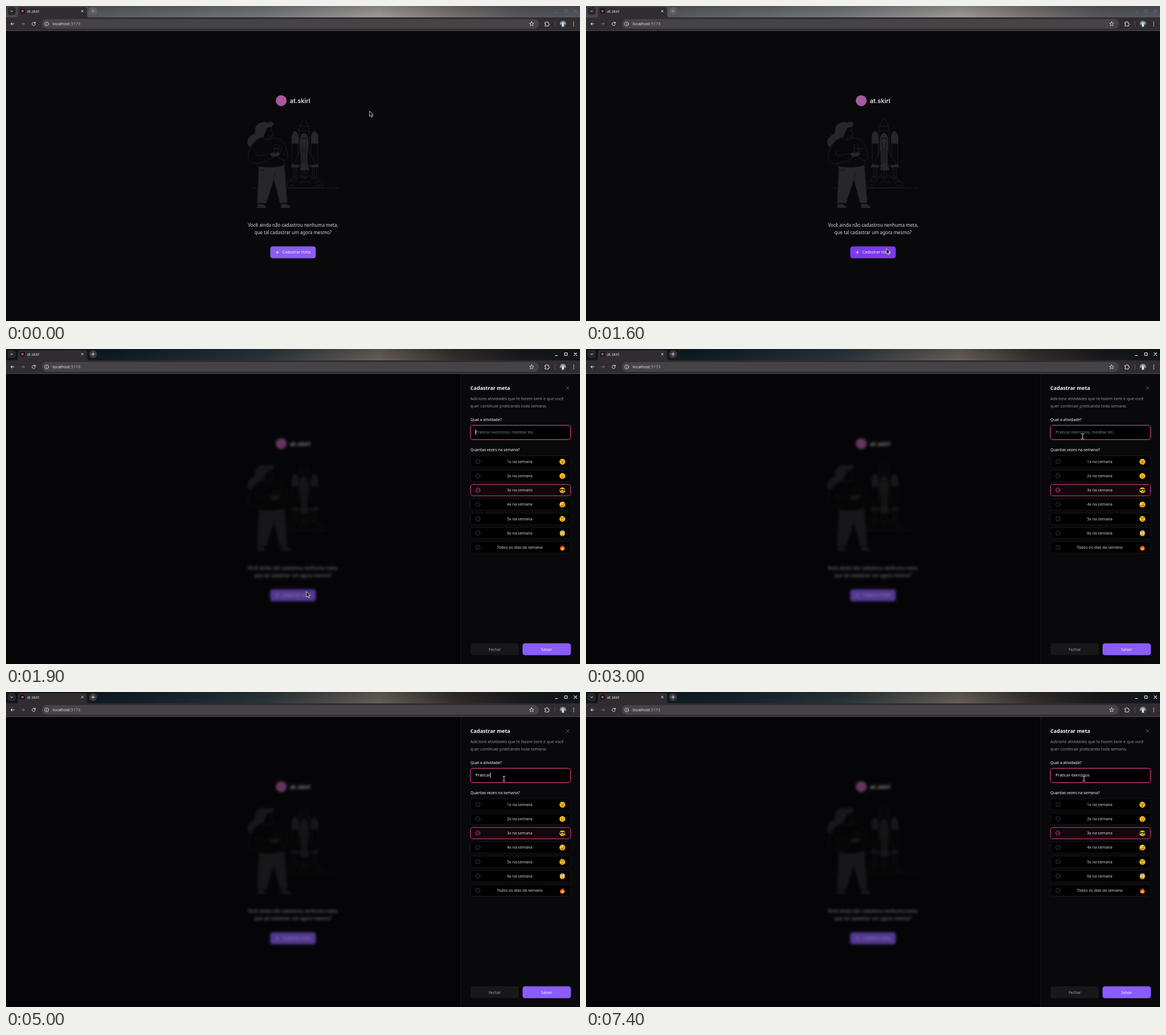
Animation of 1009x555 px, one loop 8 s. Source, as an HTML page:

```html
<!DOCTYPE html>
<html lang="pt-BR">
<head>
<meta charset="utf-8">
<title>at.skirl</title>
<style>
html, body { margin: 0; width: 100%; height: 100%; overflow: hidden; background: #09090b; }
svg { display: block; width: 100%; height: 100%; }
text { font-family: "Noto Sans", "Open Sans", sans-serif; font-size: 7.1px; white-space: pre; }
.mid { text-anchor: middle; }
.medium { font-weight: 500; font-size: 6.85px; }
.line { fill: none; stroke-linecap: round; stroke-linejoin: round; }
#page.covered { filter: blur(1.9px) brightness(.6); }
#art { stroke: #27272a; stroke-width: .7; fill: #09090b; stroke-linejoin: round; stroke-linecap: round; }
#art .solid { fill: #27272a; }
#art .open { fill: none; }
#art .cut { fill: none; stroke: #09090b; }
</style>
</head>
<body>
<svg viewBox="0 0 1009 555" preserveAspectRatio="none">
  <defs>
    <linearGradient id="idle">
      <stop offset="0" stop-color="#474b51"/><stop offset=".2" stop-color="#5b6065"/>
      <stop offset=".45" stop-color="#72777c"/><stop offset=".65" stop-color="#a09b96"/>
      <stop offset=".78" stop-color="#77716e"/><stop offset=".9" stop-color="#55575d"/>
      <stop offset="1" stop-color="#51565e"/>
    </linearGradient>
    <linearGradient id="active">
      <stop offset="0" stop-color="#10161c"/><stop offset=".2" stop-color="#111d26"/>
      <stop offset=".45" stop-color="#29343b"/><stop offset=".65" stop-color="#675f58"/>
      <stop offset=".78" stop-color="#352e2b"/><stop offset=".9" stop-color="#191a1e"/>
      <stop offset="1" stop-color="#10161d"/>
    </linearGradient>
    <linearGradient id="shade" x2="0" y2="1">
      <stop offset="0" stop-opacity=".18"/><stop offset="1" stop-opacity="0"/>
    </linearGradient>
  </defs>

  <rect id="backdrop" width="1009" height="555" fill="#09090b"/>

  <g id="page">
    <circle cx="483.8" cy="166.8" r="9.6" fill="#a6589f"/>
    <text x="499" y="170.6" fill="#e4e4e7" style="font:600 10.9px Inter,sans-serif">at.skirl</text>

    <g id="art">
      <!-- ground and smoke -->
      <path class="open" d="M435 320.5H441M494 320.5H573M576 320.5H584"/>
      <path d="M495 320C491 312 496 306 501 308C501 301 508 298 512 303C516 297 522 299 524 304C528 297 537 298 538 304C543 299 550 303 549 309C555 306 560 313 555 320Z"/>
      <path class="open" d="M501 308Q505 308 507 312M512 303Q509 306 510 310M517 313Q521 307 526 311Q532 306 535 312M549 309Q545 309 543 313M500 316Q504 313 507 317M546 317Q549 314 553 316"/>
      <!-- rocket -->
      <path class="open" d="M505 285V302M508 285V306M511 285V300M520 291V304M524 291V310M528 291V304M539 285V300M542 285V306M546 285V302"/>
      <path d="M515 282V219C516 210 520 202 524 199C528 202 532 210 533 219V282Z"/>
      <path class="open" d="M517 211Q524 214 531 211M515 220H533"/>
      <path d="M503 242V279H513V242ZM537 242V279H548V242Z"/>
      <path class="solid" d="M502.500 242V229Q504 223 508 220Q512 223 514 229V242ZM536.500 242V229Q538 223 542 220Q547 223 548.500 229V242ZM503 279H513L515 284H501ZM537 279H548L550 284H535Z"/>
      <path class="solid" d="M517 282V236C517 229 521 224 524 224C527 224 531 229 531 236V282Z"/>
      <path d="M518 253L507 276V280H519ZM530 253L544 276V280H530Z"/>
      <path class="cut" d="M519 235Q521 231 523 232L522 234ZM525 232Q528 231 529 235L526 234ZM521 240V278M527 240V278M524 250V280"/>
      <path class="solid" d="M519 283H531L533 289H517ZM523 277H526V290H523Z"/>
      <!-- person -->
      <path class="solid" d="M470 207C469 203 463 204 459 206C453 203 441 206 439 214C437 221 440 224 434 227C426 230 422 239 426 246L429 249C434 240 441 235 448 235L463 232L461 213C466 214 471 211 470 207Z"/>
      <path d="M457 219C457 214 464 212 467 214L467 221L470 226L467.500 227.500V232C466 235 462 234 460 232L458 238C452 238 450 235 452 231Z"/>
      <path class="open" d="M464 219H466M463 229Q465 231 467 229"/>
      <path d="M451 231C436 234 427 252 425.500 264C425 274 433 279 442 277L444 283Q467 288 490 281L489 272C496 271 497 265 494 257C491 243 485 233 473 233L467 233Q458 240 451 231Z"/>
      <path class="open" d="M442 277Q455 276 469 267L465 260L442 264Q438 262 440 255M489 272Q482 269 477 264M486 249Q482 252 483 258"/>
      <path class="solid" d="M465 261C468 256 472 260 475 259L480 258Q484 262 478 264L469 266Z"/>
      <path d="M471 257L472 250C469 246 472 243 476 245C480 244 482 248 478 251L480 257Z"/>
      <path class="open" d="M471 251H480M487 261H491"/>
      <path class="solid" d="M445 283Q467 288 489 281L494 346L482 347L471 304L457 347H442Z"/>
      <path class="cut" d="M470 304L473 295M448 290Q453 291 454 287"/>
      <path class="solid" d="M443 349L452 350L457 353V355.500H442ZM484 349L493 349L499.500 353V355.500H484Z"/>
    </g>

    <g fill="#d9d9dd" class="mid">
      <text x="504.500" y="388.600" style="font-size:8px">Você ainda não cadastrou nenhuma meta,</text>
      <text x="504.500" y="402.300" style="font-size:8px">que tal cadastrar um agora mesmo?</text>
    </g>
    <rect id="cta" x="464.500" y="423.400" width="80" height="21" rx="4.200"/>
    <path class="line" d="M474.300 434H479.700M477 431.300V436.700" stroke="#f5f3ff" stroke-width=".8"/>
    <text class="medium" x="486" y="436.400" fill="#f5f3ff">Cadastrar meta</text>
  </g>

  <g id="panel">
    <rect x="799" y="44" width="210" height="511" fill="#09090b"/>
    <path d="M799.500 44V555" stroke="#18181b"/>
    <text x="816.300" y="72.200" fill="#fafafa" style="font-size:9px;font-weight:700">Cadastrar meta</text>
    <path class="line" d="M984.500 66L990 71.500M990 66L984.500 71.500" stroke="#71717a" stroke-width=".8"/>
    <g fill="#94949d">
      <text x="816.300" y="90.300">Adicione atividades que te fazem bem e que você</text>
      <text x="816.300" y="102.600">quer continuar praticando toda semana.</text>
    </g>
    <g fill="#fafafa">
      <text class="medium" x="816.300" y="126.800">Qual a atividade?</text>
      <text class="medium" x="816.300" y="179.800">Quantas vezes na semana?</text>
    </g>
    <rect x="816.500" y="134.500" width="176" height="25" rx="4.500" stroke="#ec4899" stroke-opacity=".15" stroke-width="3"/>
    <rect x="816.500" y="134.500" width="176" height="25" rx="4.500" stroke="#e0408f"/>
    <text id="entry" x="825.300" y="149.400"></text>
    <rect id="caret" y="142" width=".9" height="9" fill="#fafafa"/>
    <g id="options"></g>
    <rect x="816.500" y="518.500" width="85" height="21" rx="4.200" fill="#18181b"/>
    <rect x="908" y="518.500" width="85" height="21" rx="4.200" fill="#8b5cf6"/>
    <text class="mid medium" x="859" y="531.500" fill="#a1a1aa">Fechar</text>
    <text class="mid medium" x="950.300" y="531.500" fill="#f5f3ff">Salvar</text>
  </g>

  <!-- browser chrome -->
  <rect id="titlebar" width="1009" height="20"/>
  <rect width="1009" height="20" fill="url(#shade)"/>
  <rect x="3" y="2" width="14" height="14" rx="4.500" fill="#2a272a"/>
  <path class="line" d="M8 8.200L10 10.200L12 8.200" stroke="#e5e5e5"/>
  <path d="M17 20Q21 20 21 16V6Q21 2 25 2H138Q142.500 2 142.500 6V16Q142.500 20 146.500 20Z" fill="#302c30"/>
  <rect x="25" y="5" width="8" height="8" rx="2" fill="#111014"/>
  <circle cx="29" cy="9" r="2.300" fill="#a0507f"/>
  <text x="37" y="11.500" fill="#e3e3e3" style="font-size:6.900px">at.skirl</text>
  <path class="line" d="M132.300 7.200L135.900 10.800M135.900 7.200L132.300 10.800" stroke="#e3e3e3" stroke-width=".9"/>
  <circle id="newTab" cx="153" cy="9" r="7"/>
  <path id="newTabPlus" class="line" d="M150 9H156M153 6V12" stroke-width=".9"/>
  <path id="windowButtons" class="line" d="M965.500 11.500H969.500M982 6.800H986.500V11.300H982ZM998.700 6.800L1003.300 11.400M1003.300 6.800L998.700 11.400" stroke-width="1.100"/>
  <rect y="20" width="1009" height="24" fill="#302c30"/>
  <path d="M0 43.500H1009" stroke="#4b484b"/>
  <rect x="63" y="23" width="874" height="17" rx="8.500" fill="#454345"/>
  <g class="line" stroke="#e3e3e3" stroke-width="1">
    <path d="M14 31.500H8.500M11 29L8.500 31.500L11 34M51 29.700A2.900 2.900 0 1 0 51.500 32.300M51.600 28.200V30.300H49.400"/>
    <path d="M27 31.500H32.500M30 29L32.500 31.500L30 34" stroke="#777377"/>
    <circle cx="71.500" cy="31.500" r="3.500" stroke-width=".8"/>
    <path d="M71.500 31.200V33.200M71.500 29.800V29.900" stroke-width=".8"/>
    <path d="M924 27.700L925.100 30.200L927.800 30.400L925.700 32.200L926.400 34.900L924 33.400L921.600 34.900L922.300 32.200L920.200 30.400L922.900 30.200Z" stroke-width=".8"/>
    <path d="M947.500 29H949.500Q949.500 27.300 950.700 27.300Q952 27.300 952 29H953.800V31Q955.300 31 955.300 32.200Q955.300 33.400 953.800 33.400V35.200H947.500V33.200Q949 33 949 32Q949 31 947.500 31Z"/>
    <path d="M965 27V36" stroke="#5a565a"/>
    <path d="M998 28.500V28.600M998 31.500V31.600M998 34.500V34.600" stroke-width="1.700"/>
  </g>
  <text x="82" y="34.100" fill="#e8e8e8" style="font-size:7.200px">localhost<tspan fill="#b5b2b5">:5173</tspan></text>
  <circle cx="979" cy="31.500" r="5.500" fill="#8296a8"/>
  <path d="M973.800 33.500A5.500 5.500 0 0 0 984.200 33.500Q979 31 973.800 33.500Z" fill="#28313a"/>
  <path d="M977 36.500V30.500Q979 27 981 30.500V36.500Z" fill="#d2d6d8"/>

  <g id="cursor">
    <path id="arrow" d="M0 0V9.600L2.200 7.600L3.700 10.900L5.200 10.200L3.700 7H6.700Z" fill="#0b0b0b" stroke="#e8e8e8" stroke-width=".8" stroke-linejoin="round"/>
    <path id="beam" class="line" d="M-2 -4Q0 -4 0 -3Q0 -4 2 -4M0 -3V4M-2 5Q0 5 0 4Q0 5 2 5" stroke="#f4f4f5" stroke-width=".9"/>
  </g>
</svg>
<script>
const $ = id => document.getElementById(id);
const attr = (id, name, value) => $(id).setAttribute(name, value);
const show = (id, on) => attr(id, "visibility", on ? "visible" : "hidden");

const ink = (d, color = "#5b4226") => `<path class="line" d="${d}" stroke="${color}" stroke-width=".9"/>`;
const dot = (x, y, r = .75, color = "#5b4226") => `<circle cx="${x}" cy="${y}" r="${r}" fill="${color}"/>`;
const face = dot(0, 0, 5.1, "#fcc21b");
const eyes = dot(-1.7, -1) + dot(1.7, -1);
const emojis = [
  face + ink("M-3 -1.500L-1 -1M3 -1.500L1 -1") + dot(0, 1.6, 1.3) +
    '<path d="M-2 4.800L0 1.500L4 2Q4 5 1 5.500Z" fill="#f39c12"/>',
  face + eyes + ink("M-2 1.700Q0 3.500 2 1.700"),
  face + '<path d="M-5 -2.300H5L4 .7Q2 1.700 .7 -.7H-.7Q-2 1.700 -4 .7Z" fill="#242329"/>' + ink("M-1.500 2.600Q1 3.400 2.500 2"),
  face + dot(-1.8, -1.3, 1.5, "#fff") + dot(-1.8, -1.3) + ink("M1 -1L3 -1.300M-2.800 1.200Q0 2.700 2.800 1.200") +
    '<path d="M-1.300 2H1.500V4Q0 5.500 -1.300 4Z" fill="#ed4c5c"/>',
  face + eyes + ink("M-3 -2H-1M.8 -3Q2 -4 3.200 -2.800M-1.500 2.500H1.800"),
  '<path d="M-3.500 -1Q-6 -3 -3 -3.500Q-2 -6 0 -4.700Q3 -6 3.500 -3.500Q6 -2 3.500 -1Z" fill="#b9c5cc"/>' +
    '<path d="M-4.500 -1.500L-2 -2.500L0 -1L2 -2.500L4.500 -1.500Q5 4.800 0 5Q-5 4.800 -4.500 -1.500Z" fill="#fcc21b"/>' +
    ink("M-1.500 -3.500L0 -2.500L1.500 -3.500", "#e86a42") + dot(-1.7, .6, 1.1, "#fff") + dot(1.7, .6, 1.1, "#fff") +
    dot(-1.7, .6, .5) + dot(1.7, .6, .5) + dot(0, 3, .9),
  '<path d="M0 -5.300C1 -2.500 4.700 -1 4.300 2C4 5.800 -3.800 6 -4.200 2C-4.400 0 -3 -1 -2.600 -2.600L-1.200 -1.200Q.5 -3 0 -5.300Z" fill="#f5612e"/>' +
    '<path d="M.2 -1C1 1 2.700 1.500 2.300 3.400Q0 6 -2.200 3.500C-2.500 1.700 0 1 .2 -1Z" fill="#fcc21b"/>'
];
$("options").innerHTML = emojis.map((emoji, i) => {
  const chosen = i === 2;
  const label = i < 6 ? `${i + 1}x na semana` : "Todos os dias da semana";
  return `<g transform="translate(0 ${198.2 + i * 25.24})">
    <rect x="816.500" y="-10" width="176" height="20" rx="4.200"
      fill="${chosen ? "#14060d" : "#000"}" stroke="${chosen ? "#d64088" : "#18181b"}"/>
    <circle class="line" cx="829.500" r="3.700" stroke="${chosen ? "#ec4899" : "#52525b"}" stroke-width=".8"/>
    ${chosen ? ink("M828 0L829.200 1.200L831.300 -1", "#ec4899") : ""}
    <text class="mid medium" x="903" y="2.400" fill="#d4d4d8">${label}</text>
    <g transform="translate(978 .3)">${emoji}</g></g>`;
}).join("");

const LOOP = 8000, STEP = 100, OPEN = 1900;
const PHRASE = "Praticar exercícios";
// [time, letters typed]
const typing = [[4200, 1], [4300, 2], [4400, 3], [4500, 4], [4700, 6], [4800, 7], [5000, 8], [5200, 9],
  [5400, 10], [5600, 11], [5800, 12], [6000, 13], [6100, 14], [6500, 15], [6600, 16], [6700, 17], [6800, 19]];
// [time, x, y]
const route = [[400, 639, 185], [700, 662, 228], [1000, 634, 325], [1300, 543, 420], [1600, 528, 427.5],
  [1900, 528, 427.5], [2200, 750, 320], [2400, 867, 271], [2600, 867, 271], [2800, 871, 195],
  [3000, 873, 153.3], [3300, 875.3, 152.3]];

function pointerAt(t) {
  const next = route.findIndex(k => k[0] > t);
  if (next <= 0) return (next ? route[route.length - 1] : route[0]).slice(1);
  const [t0, x0, y0] = route[next - 1], [t1, x1, y1] = route[next];
  const k = (t - t0) / (t1 - t0);
  return [x0 + (x1 - x0) * k, y0 + (y1 - y0) * k];
}

function typedAt(t) {
  const count = typing.filter(k => k[0] <= t).reduce((_, k) => k[1], 0);
  const accentPending = t >= 6300 && t < 6500;
  return PHRASE.slice(0, count) + (accentPending ? "´" : "");
}

function draw(t) {
  const focused = t >= 1800, open = t >= OPEN;
  attr("titlebar", "fill", focused ? "url(#active)" : "url(#idle)");
  attr("newTab", "fill", focused ? "#39383a" : "#625e5e");
  attr("newTabPlus", "stroke", focused ? "#f0f0f0" : "#a49a94");
  attr("windowButtons", "stroke", focused ? "#f4f4f4" : "#666a70");
  attr("backdrop", "fill", open ? "#050507" : "#09090b");
  attr("cta", "fill", t >= 1400 && !open ? "#7c3aed" : "#8b5cf6");
  $("page").classList.toggle("covered", open);
  show("panel", open);

  const typed = typedAt(t), entry = $("entry");
  entry.textContent = typed || "Praticar exercícios, meditar etc.";
  attr("entry", "fill", typed ? "#f4f4f5" : "#85858e");
  const advance = typed ? entry.getComputedTextLength() : 0;
  attr("caret", "x", 825.2 + advance);
  const blinkedOff = (t >= 2700 && t < 3200) || (t >= 3700 && t < 4200) || (t >= 7400 && t < 7900);
  show("caret", open && !blinkedOff);

  const [x, y] = pointerAt(t);
  const overInput = open && x > 816 && y < 160;
  attr("cursor", "transform", `translate(${x} ${y})`);
  show("arrow", !overInput);
  show("beam", overInput);
}

function tick() {
  draw(Math.floor(performance.now() % LOOP / STEP) * STEP);
  requestAnimationFrame(tick);
}
tick();
</script>
</body>
</html>
```
